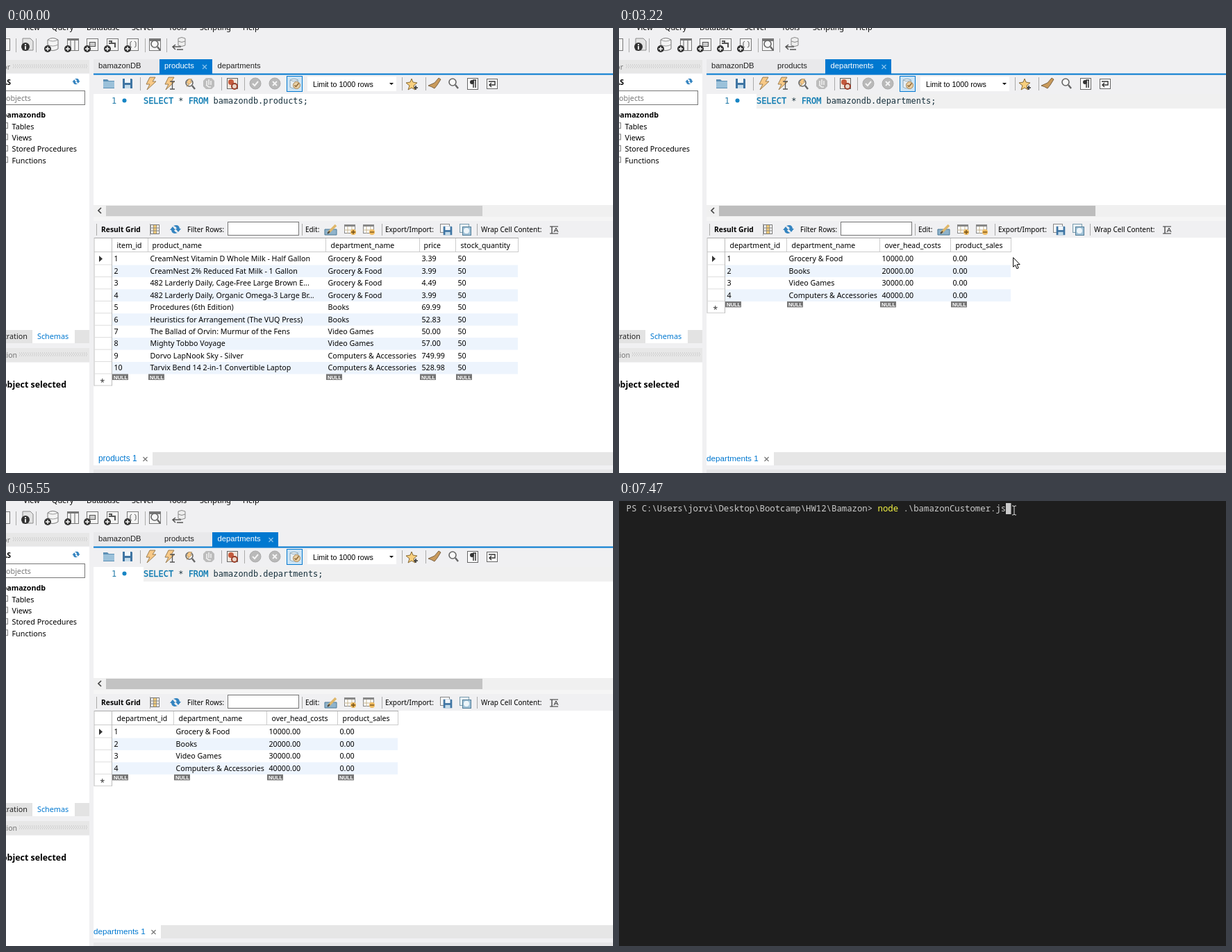
An HTML page that plays this animation: 874 px wide and 641 px high, repeating every 8000 ms.

```html
<!DOCTYPE html>
<html lang="en">
<head>
<meta charset="utf-8">
<title>Database client</title>
<style>
html, body { margin: 0; width: 100%; height: 100%; overflow: hidden; background: #f0f0f2; }
svg { display: block; width: 874px; height: 641px; font-family: "Noto Sans", sans-serif; }
text { white-space: pre; }
.ui { font-family: "Liberation Sans", Arial, sans-serif; }
.code { font-family: "DejaVu Sans Mono", monospace; }
.term { font-family: "Noto Sans Mono", monospace; }
</style>
</head>
<body>
<svg id="stage" viewBox="0 0 874 641"></svg>
<script>
const BLUE = '#0078d0', INK = '#000', GREY = '#555';

const rect = (x, y, w, h, fill, extra = '') =>
  `<rect x="${x}" y="${y}" width="${w}" height="${h}" fill="${fill}" ${extra}/>`;
const frame = (x, y, w, h, fill, stroke) => rect(x + .5, y + .5, w - 1, h - 1, fill, `stroke="${stroke}"`);
const line = (d, stroke = GREY, width = 1, extra = '') =>
  `<path d="${d}" fill="none" stroke="${stroke}" stroke-width="${width}" ${extra}/>`;
const shape = (d, fill, extra = '') => `<path d="${d}" fill="${fill}" ${extra}/>`;
const dot = (x, y, r, fill, extra = '') => `<circle cx="${x}" cy="${y}" r="${r}" fill="${fill}" ${extra}/>`;
const text = (x, y, s, size = 10.7, fill = INK, extra = '') =>
  `<text x="${x}" y="${y}" font-size="${size}" fill="${fill}" ${extra}>${s.replace(/&/g, '&amp;').replace(/</g, '&lt;')}</text>`;
const at = (x, y, body) => `<g transform="translate(${x} ${y})">${body}</g>`;
const scaled = (k, body) => `<g transform="scale(${k})">${body}</g>`;
const layer = (id, body) => `<g id="${id}">${body}</g>`;
const UI = 'class="ui"', BOLD = 'font-weight="bold"', END = 'text-anchor="end"';

// Icons are drawn around their own centre.
const plus = at(-6, 6, dot(0, 0, 5, '#333') + line('M-3 0H3M0-3V3', '#fff', 1.4));
const cylinder = shape('M-6-7V6Q1 11 9 6V-7Q1-12-6-7Z', '#f4f4f4', 'stroke="#777"') + line('M-6-7Q1-3 9-7M-6 0Q1 4 9 0', '#999');
const sheet = frame(-7, -9, 17, 18, '#f4f4f4', '#777');
const columns = rect(-7, -9, 17, 3, '#777') + line('M-2-6V8M4-6V8', '#aaa', 2);
const refresh = shape('M-8 1L-4-4 0 1H-2Q-1 4 3 5Q-5 8-6 1ZM8-1L4 4 0-1H2Q1-4-3-5Q5-8 6-1Z', '#3484c0');
const bolt = shape('M-2-9H6L2-3H7L-6 9-2 1H-7Z', '#f8c987', 'stroke="#9b7d50"');
const lens = dot(-1, -2, 5, '#f8f8f8', 'stroke="#666" stroke-width="1.6"') + line('M3 2L7 7', '#666', 2.4);
const floppy = shape('M-7-7H6L7-6V7H-7Z', '#3f75a3') + rect(-4, -7, 8, 6, '#f1f6fa') + rect(-4, 2, 8, 5, '#c5dceb');
const folder = shape('M-8-6H-2L0-4H8V7H-8Z', '#5d90b5') + rect(-8, -3, 16, 9, '#9bc1da');
const grid = frame(-9, -7, 16, 13, '#fff', '#888') + rect(-9, -7, 16, 3, '#888') + line('M-4-4V6M2-4V6M-9 1H7', '#c5b48f');
const disc = mark => dot(0, 0, 8, '#b9b9b9', 'stroke="#aaa"') + line(mark, '#f4f4f4', 2);
const star = shape('M0-8L2-3 8-2 3 2 5 8 0 5-5 8-3 2-8-2-2-3Z', '#f8cf7d', 'stroke="#876a38"');
const page = frame(-8, -8, 16, 17, '#fafafa', '#666');

const topIcons = [
  [-4, 24, sheet],
  [31, 24, shape('M-7-9H4L8-5V8H-7Z', '#e4e4e4', 'stroke="#888"') + dot(-3, 3, 6, '#333') + line('M-3-1V1M-3 2V7', '#fff', 2)],
  [66, 24, cylinder + plus], [95, 24, sheet + columns + plus],
  [123, 24, sheet + frame(-3, -4, 9, 7, '#ccc', '#555') + plus],
  [152, 24, sheet + line('M-4-5H0V-2H5V4M-4-2H1', '#555', 2) + plus],
  [181, 24, sheet + line('M0-5Q-3-4-2 0Q-3 3 0 4M4-5Q7-4 6 0Q7 3 4 4', '#555') + plus],
  [213, 24, sheet + rect(-7, -9, 17, 4, '#777') + at(2, 1, lens)],
  [249, 23, shape('M-1-8V2Q4 5 9 2V-8Q4-11-1-8Z', '#eee', 'stroke="#888"') + line('M-1-4Q4-1 9-4', '#888') + line('M-9 4H3M-5 1L-9 4-5 8M-3 8H6', '#555', 1.5)]
];
const editorIcons = [
  [148, 80, folder], [175, 80, floppy], [209, 80, bolt],
  [236, 80, bolt + line('M0-3H7M3.500-3V8M0 8H7', '#555', 1.3)],
  [264, 80, at(1, 1, lens) + at(0, -1, scaled(.6, bolt))],
  [292, 80, shape('M-4-8H4L8-4V4L4 8H-4L-8 4V-4Z', '#bcbcbc') + line('M-3 2V-4M0 2V-6M3 2V-4M-4 2L0 5H3', '#eee', 1.6)],
  [326, 80, frame(-8, -8, 16, 16, '#f1e6dc', '#666') + dot(-2, -2, 4, '#c45b3d') + dot(3, 4, 4, '#ead7c8', 'stroke="#9b3e29" stroke-width="2"')],
  [359, 80, disc('M-4 0L-1 3 4-3')], [387, 80, disc('M-3-3L3 3M3-3L-3 3')],
  [415.5, 80.5, frame(-11.5, -11.5, 23, 23, '#cce4f5', BLUE) + scaled(.8, shape('M-8-7V6Q-1 10 6 6V-7Q-1-11-8-7Z', '#e6eef3', 'stroke="#7f9daf"') + line('M-8-7Q-1-3 6-7', '#7f9daf')) +
    dot(3, 2, 5, '#e9cfa4', 'stroke="#a88350"') + line('M0 2L2 4 6-1', '#8a6534', 1.5)],
  [584, 81, star + line('M3 5H9M6 2V8', '#333', 1.6)],
  [617, 80, shape('M0-1L6-8 9-6 4 2 0 7Q-5 4-9 3Z', '#c99a5b', 'stroke="#7d6446"')],
  [644, 80, lens], [672, 80, page + line('M1-5V6M4-5V6M5-5H0', '#333', 1.5) + dot(-1, -2, 3, '#333')],
  [700, 80, frame(-8, -7, 16, 15, '#fafafa', '#666') + line('M-5-3H4V2H-4M-1-1L-4 2-1 5', '#333', 1.4)]
];
const badge = mark => at(4, 4, dot(0, 0, 4, '#efbb60') + line(mark, '#714d15', 1.3));
const resultIcons = [
  [214, 290, frame(-6, -7, 13, 14, '#fff', '#777') + rect(-2, -6, 5, 12, '#efc976') + line('M-2-6V6M3-6V6M-6-2H6M-6 2H6', '#888')],
  [244, 290, refresh],
  [468, 290, shape('M-9 0H8V8H-9Z', '#8fb3cb', 'stroke="#4b7896"') + line('M-4 5L7-6', '#dfb76a', 3.5) + line('M-5 6L-2 3', '#444', 2)],
  [496, 290, grid + badge('M-3 0H3M0-3V3')], [523, 290, grid + badge('M-3 0H3')],
  [633, 290, frame(-8, -8, 14, 13, '#f6f6f6', '#888') + at(3, 2, scaled(.9, floppy))],
  [661, 290, frame(-8, -8, 14, 13, '#e7f0f5', '#7d9daf') + at(2, 2, frame(-6, -6, 13, 13, '#a1c2d7', '#527d98') + dot(0, 0, 4, '#eef5f9'))],
  [789, 291, line('M-6-5H6M-6 5H6M-3-5V5', '#333', 1.2) + line('M0 3L3-3 6 3M1 1H5', '#333')]
];
const icons = list => list.map(([x, y, body]) => at(x, y, body)).join('');
const separators = (xs, y, h) => xs.map(x => rect(x, y, 1, h, '#aaa')).join('');
const grip = (x, y, end) => [0, 2, 4].map(i =>
  line(`M${x + i % 4 / 2} ${y + i}H${end}`, '#b9b9b9', 1, 'stroke-dasharray="1 2"')).join('');

function leftPanel() {
  const tree = ['Tables', 'Views', 'Stored Procedures', 'Functions'];
  return rect(0, 66, 120, 369, '#fff') + rect(0, 46, 120, 19, '#e7e7e7') +
    text(6, 60, 'Navigator', 10.5, '#777', END) + grip(10, 53, 118) +
    text(7, 82, 'SCHEMAS', 10.5, INK, `${BOLD} ${END}`) + at(101, 77, scaled(.7, refresh)) +
    frame(-5, 90, 119, 21, '#fff', '#777') + text(36, 104.5, 'Filter objects', 10.7, '#777', END) +
    text(57, 129, 'bamazondb', 10.7, INK, `${BOLD} ${END}`) +
    tree.map((s, i) => frame(-4, 136 + i * 16.4, 7, 9, '#eee', '#888') + text(8.5, 145.5 + i * 16.4, s, 10.8)).join('') +
    rect(0, 435, 120, 19, '#e3e3e3') + rect(38, 435, 61, 19, '#fff') +
    text(31, 448, 'Administration', 10.8, '#222', END) + text(45, 448, 'Schemas', 10.8, BLUE) +
    rect(0, 461, 120, 20, '#e7e7e7') + text(16, 475, 'Information', 10.5, '#777', END) + grip(19, 468, 118) +
    rect(0, 482, 120, 159, '#fff') + text(87, 518, 'No object selected', 12.4, INK, `${BOLD} ${END}`);
}

function base() {
  const menus = [[25, 'View'], [66, 'Query'], [116, 'Database'], [181, 'Server'], [234, 'Tools'], [279, 'Scripting'], [341, 'Help']];
  return rect(0, 0, 874, 641, '#f0f0f2') + menus.map(([x, s]) => text(x, 3, s, 10.8)).join('') +
    separators([14, 43, 200, 231], 15, 20) + icons(topIcons) + leftPanel() +
    rect(126, 45, 95, 20, '#e9e9eb') + text(133, 58, 'bamazonDB', 11.2, '#222', UI) + rect(126, 65.5, 748, 2, BLUE) +
    separators([193, 310, 343, 570, 604], 71, 19) + icons(editorIcons) +
    rect(434, 70, 128, 21, '#fff') + text(442, 85, 'Limit to 1000 rows', 10.7, INK, UI) + shape('M552 79H558L555 82Z', INK) +
    rect(126, 95, 748, 160, '#fff') + rect(198, 95, 676, 21, '#f0f0f0', 'id="current"') +
    text(152, 109, '1', 11.9, '#237ba8', 'class="code"') + dot(170.5, 104.5, 3, '#1685c4') +
    rect(126, 255, 748, 17, '#f0f0f0') + line('M137 259L133 263 137 267', '#444', 1.7) + rect(144, 256, 542, 15, '#cdcdcd', 'id="thumb"') +
    rect(126, 272, 748, 6, '#f5f5f5') + separators([130, 207, 426, 541, 678], 282, 17) + icons(resultIcons) +
    text(137, 294, 'Result Grid', 10.3, INK, BOLD) + text(261, 294, 'Filter Rows:', 9.9) + frame(319, 279, 103, 20, '#fff', '#777') +
    text(431, 294, 'Edit:', 9.9) + text(546, 294, 'Export/Import:', 10) + text(684, 294, 'Wrap Cell Content:', 10) +
    rect(126, 302, 748, 309, '#fff') + rect(126, 611, 748, 19, '#e6e6e6') + rect(126, 636, 748, 5, '#e6e6e8');
}

const cross = (x, y, color, r = 3) => line(`M${x - r} ${y - r}L${x + r} ${y + r}M${x + r} ${y - r}L${x - r} ${y + r}`, color, 1.2);

function table(columns, rows) {
  const step = 17.45, top = 324, edges = columns.map(c => c[0]), right = columns.at(-1)[2];
  const bottom = top + step * rows.length;
  let out = rect(127, 302, right - 126, 1, '#aaa') + rect(127, 322, right - 126, 1, '#ccc');
  out += rect(126.5, 302, 1, bottom - 285, '#bbb') + rect(152, 302, 1, bottom - 285, '#bbb');
  columns.forEach(([x, label, end, labelX]) => {
    out += text(labelX - .5, 317, label, 10.5) + rect(end, 303, 1, 19, '#ccc') +
      rect(x + 1, bottom - .5, 23, 9, '#777') + text(x + 3, bottom + 7, 'NULL', 7.6, '#fff', `${UI} ${BOLD}`);
  });
  rows.forEach((row, r) => {
    const y = top + r * step;
    if (r % 2) out += rect(153, y, right - 153, step, '#edf4fd');
    out += rect(127, y + step - 1, 25, 1, '#ddd');
    row.forEach((s, c) => out += text(edges[c] + 3.5, y + 12.3, s));
  });
  return out + shape('M134 328L139 332.500 134 337Z', '#333') +
    text(135.5, bottom + 16, '*', 12, '#333') + rect(127, bottom + 16, 25, 1, '#ccc');
}

const query = name => text(198, 109,
  `SELECT * FROM bamazondb.${name};`, 11.93, '#17313d', 'class="code"')
  .replace(/SELECT|FROM/g, '<tspan fill="#0878b0" stroke="#0878b0" stroke-width=".3">$&</tspan>');

const products = [
  ['CreamNest Vitamin D Whole Milk - Half Gallon', 0, '3.39'],
  ['CreamNest 2% Reduced Fat Milk - 1 Gallon', 0, '3.99'],
  ['482 Larderly Daily, Cage-Free Large Brown E...', 0, '4.49'],
  ['482 Larderly Daily, Organic Omega-3 Large Br...', 0, '3.99'],
  ['Procedures (6th Edition)', 1, '69.99'],
  ['Heuristics for Arrangement (The VUQ Press)', 1, '52.83'],
  ['The Ballad of Orvin: Murmur of the Fens', 2, '50.00'],
  ['Mighty Tobbo Voyage', 2, '57.00'],
  ['Dorvo LapNook Sky - Silver', 3, '749.99'],
  ['Tarvix Bend 14 2-in-1 Convertible Laptop', 3, '528.98']
];
const departments = ['Grocery & Food', 'Books', 'Video Games', 'Computers & Accessories'];

const productView = rect(221, 45, 76, 21, BLUE, 'id="activeTab"') + cross(286, 56, '#8cc5ed') +
  layer('hover', rect(290, 45, 100, 22.5, '#e5e5e8')) +
  text(228, 58, 'products', 11.2, '#fff', UI) + text(304.5, 58, 'departments', 11.2, '#222', UI) + query('products') +
  table([[152, 'item_id', 204, 160], [204, 'product_name', 460, 211], [460, 'department_name', 595, 468],
    [595, 'price', 647, 602], [647, 'stock_quantity', 737, 655]],
    products.map(([name, dept, price], i) => [`${i + 1}`, name, departments[dept], price, '50'])) +
  rect(126, 611, 85, 19, '#fff') + text(133, 624, 'products 1', 11.9, BLUE, UI) + cross(200.5, 621, '#777');

const departmentView = rect(221, 45, 76, 20, '#e9e9eb') + rect(297, 45, 95, 21, BLUE) + cross(381.5, 56, '#8cc5ed') +
  text(228, 58, 'products', 11.2, '#222', UI) + text(304.5, 58, 'departments', 11.2, '#fff', UI) + query('departments') +
  table([[152, 'department_id', 241, 160], [241, 'department_name', 375, 249], [375, 'over_head_costs', 477, 383],
    [477, 'product_sales', 564, 485]],
    departments.map((name, i) => [`${i + 1}`, name, `${i + 1}0000.00`, '0.00'])) +
  rect(126, 611, 97, 19, '#fff') + text(126, 624, 'departments 1', 11.7, BLUE, UI) + cross(212.5, 621, '#777');

const terminal = rect(0, 0, 874, 641, '#1e1e1e') +
  text(10.5, 15, 'PS C:\\Users\\jorvi\\Desktop\\Bootcamp\\HW12\\Bamazon> node .\\bamazonCustomer.js', 12.32, '#ccc', 'class="term"')
    .replace('node', '<tspan fill="#f5f543">node</tspan>') + rect(557, 3, 7.5, 16, '#ccc');
const arrow = shape('M0 0V13.500L3 10.800 5.200 16 7.600 15 5.300 10H9.500Z', '#fff', 'stroke="#000" stroke-linejoin="round"');
const beam = line('M-3-6H-1L0-5 1-6H3M0-5V6M-3 7H-1L0 6 1 7H3', '#ddd');

const stage = document.getElementById('stage');
stage.innerHTML = base() + layer('products', productView) + layer('departments', departmentView) +
  rect(198, 94, 2, 22, '#000', 'id="caret"') + layer('terminal', terminal) + layer('arrow', arrow) + layer('beam', beam);
const el = id => document.getElementById(id);
const show = (id, on) => el(id).setAttribute('display', on ? 'inline' : 'none');

// Time, x, y
const arrowPath = [
  [70, 640, 602], [280, 708, 470], [490, 660, 330], [700, 590, 320], [840, 572, 430], [910, 553, 480], [1050, 600, 564],
  [1260, 710, 530], [1450, 733.5, 401.5], [1680, 726, 308], [1840, 726, 308], [2220, 500, 160], [2520, 332.5, 54.5],
  [2670, 332.5, 54.5], [3000, 490, 250], [3220, 567.5, 330.5], [3450, 610, 370], [3640, 675, 398], [3850, 570, 412],
  [4050, 500, 335], [4230, 480, 261], [4850, 480, 261], [4920, 477.5, 268.5], [5200, 455, 400], [5550, 430, 598]
];
const beamPath = [[6390, 480, 340], [6600, 540, 180], [7010, 569, 13]];

function along(path, t) {
  const next = path.findIndex(p => p[0] > t);
  if (next === 0) return path[0].slice(1);
  if (next < 0) return path.at(-1).slice(1);
  const [a, b] = [path[next - 1], path[next]], k = (t - a[0]) / (b[0] - a[0]);
  return [1, 2].map(i => a[i] + (b[i] - a[i]) * k);
}
const fade = (t, from, to) => Math.min(1, Math.max(0, (t - from) / (to - from)));

function draw(now) {
  const t = now % 8000, second = t >= 2670, focused = second && t < 5780, shell = t >= 6390;
  const hover = t >= 2450 && !second;
  show('products', !second);
  show('departments', second);
  show('hover', hover);
  el('activeTab').setAttribute('width', hover ? 69 : 76);
  show('current', focused);
  show('caret', focused && Math.floor((t - 2650) / 530) % 2 === 0);
  const passing = .6 * fade(t, 2960, 3060) * (1 - fade(t, 3150, 3540));
  const resting = fade(t, 4180, 4460) * (1 - .35 * fade(t, 4900, 5000)) * (1 - fade(t, 5200, 5860));
  const shade = Math.round(205 - 33 * (passing + resting));
  el('thumb').setAttribute('fill', `rgb(${shade},${shade},${shade})`);
  show('terminal', shell);
  show('arrow', t >= 70 && t < 5550);
  show('beam', shell);
  el('arrow').setAttribute('transform', `translate(${along(arrowPath, t)})`);
  el('beam').setAttribute('transform', `translate(${along(beamPath, t)})`);
}
const start = performance.now();
function tick() {
  draw(performance.now() - start);
  requestAnimationFrame(tick);
}
tick();
</script>
</body>
</html>
```
